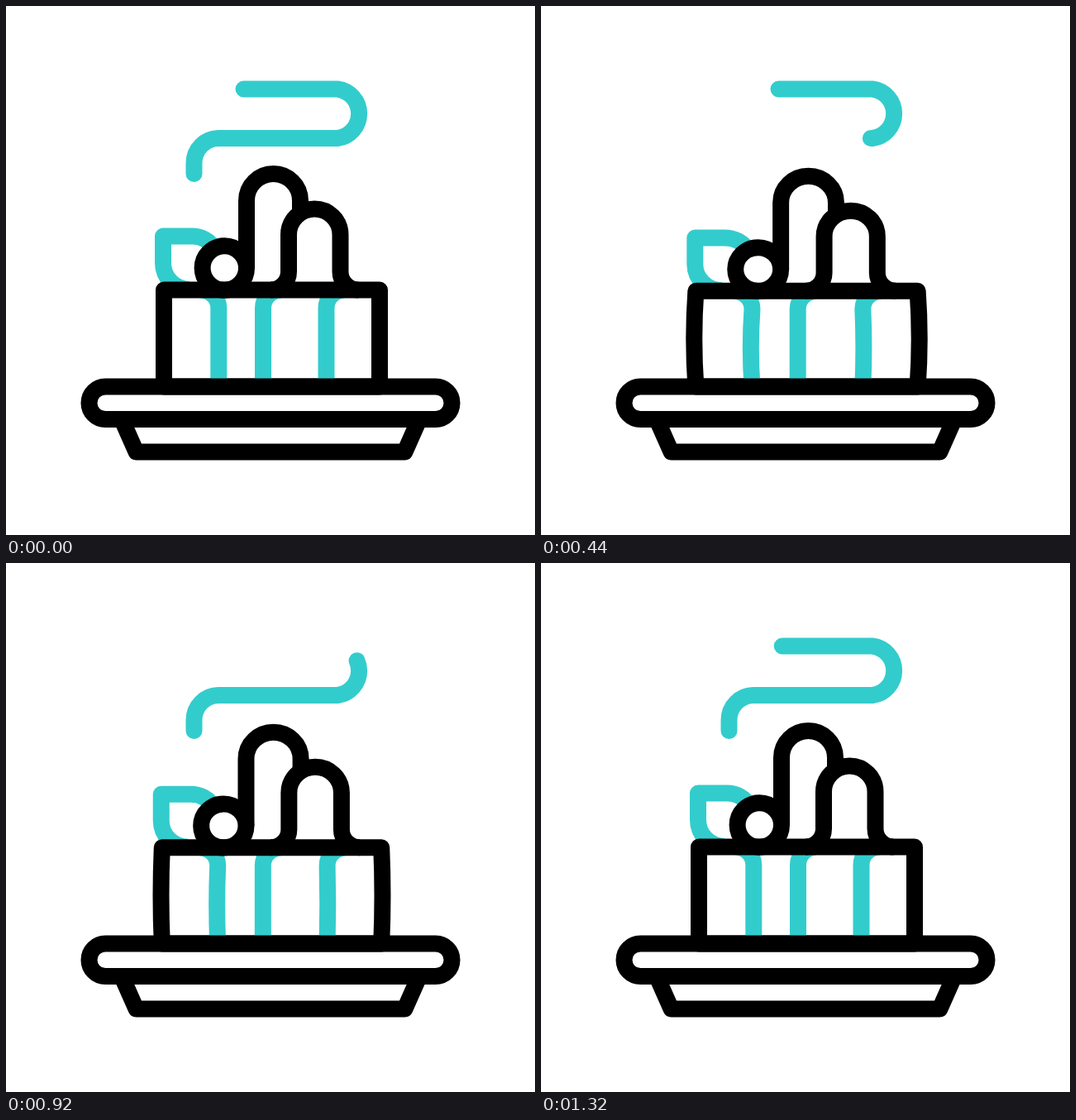
An HTML page that plays this animation: 640 px wide and 640 px high, repeating every 1480 ms.

```html
<!DOCTYPE html>
<html lang="en">
<head>
<meta charset="utf-8">
<title>Cake</title>
<style>
  html, body { margin: 0; width: 100%; height: 100%; overflow: hidden; background: #fff; }
  svg { display: block; width: 640px; height: 640px; }
  path, circle, rect { fill: none; stroke: #000; stroke-width: 20; stroke-linejoin: round; }
  #cake * { vector-effect: non-scaling-stroke; }
  .teal, .teal * { stroke: #33cccc; }
  #steam { stroke-linecap: round; }
  #berry { fill: #fff; }
</style>
</head>
<body>
<svg xmlns="http://www.w3.org/2000/svg" width="640" height="640">
  <path id="steam" class="teal" pathLength="1"
    d="M227.5 203V190A30 30 0 0 1 257.5 160H401A30 30 0 0 0 401 100.5H287.5"/>
  <path d="M140 500L157.5 539.5H482.5L500 500"/>
  <rect x="100.5" y="460.5" width="439" height="39.5" rx="19.75"/>
  <g id="cake">
    <g class="teal">
      <path id="dripL"/>
      <path id="dripM"/>
      <path id="dripR"/>
      <path d="M252 293A32 32 0 0 0 225 278.5H190V311A32 32 0 0 0 222 343"/>
    </g>
    <path d="M291 317V235.5A32.5 32.5 0 0 1 356 235.5V249"/>
    <circle id="berry" cx="264.3" cy="317" r="26.7"/>
    <path d="M320 343.5A22 22 0 0 0 342 321.5V276.7A31.25 31.25 0 0 1 404.5 276.7V321.5A22 22 0 0 0 426.5 343.5"/>
    <path id="body"/>
  </g>
</svg>
<script>
const LOOP = 1480, STEP = 40, LAST = 1320;
const CX = 321.5, TOP = 343.5, BASE = 460.5;
const $ = id => document.getElementById(id);
const clamp = x => Math.min(1, Math.max(0, x));
const smooth = x => x * x * (3 - 2 * x);

// [time, squash]: positive is flat and wide, negative is tall and narrow
const squashKeys = [[40, 0], [300, 1], [580, -0.54], [800, 0], [880, 0], [1050, 1], [1220, 0]];

function squashAt(t) {
  let value = squashKeys[0][1];
  for (let i = 1; i < squashKeys.length; i++) {
    const [t0, a] = squashKeys[i - 1], [t1, b] = squashKeys[i];
    if (t >= t0) value = a + (b - a) * smooth(clamp((t - t0) / (t1 - t0)));
  }
  return value;
}

function liftAt(t) {
  const x = (t - 695) / 195;
  return 30 * Math.max(0, 1 - x * x);
}

function bezier(x1, y1, x2, y2) {
  const at = (u, a, b) => 3 * u * (1 - u) * ((1 - u) * a + u * b) + u * u * u;
  return x => {
    let lo = 0, hi = 1;
    for (let i = 0; i < 24; i++) {
      const mid = (lo + hi) / 2;
      if (at(mid, x1, x2) < x) lo = mid; else hi = mid;
    }
    return at(lo, y1, y2);
  };
}
const flow = bezier(0.2, 0.2, 0.12, 1);

function drawSteam(t) {
  const erasing = t < 640;
  const from = erasing ? Math.pow(clamp((t - 40) / 543), 2.27) : 0;
  const to = erasing ? (t < 80 ? 1 : 1) : flow(clamp((t - 715) / 725));
  const len = to - from;
  const steam = $('steam');
  steam.style.visibility = len > 0.001 ? 'visible' : 'hidden';
  steam.setAttribute('stroke-dasharray', `${len} 2`);
  steam.setAttribute('stroke-dashoffset', -from);
}

// A drip that leaves the top edge sideways, then runs down with a bend
function drip(id, x, side, bend) {
  const y = TOP + 22;
  $(id).setAttribute('d',
    `M${x + side * 22} ${TOP}A22 22 0 0 ${side < 0 ? 1 : 0} ${x} ${y}Q${x + 2 * bend} ${(y + BASE) / 2} ${x} ${BASE}`);
}

function drawCake(t) {
  const s = squashAt(t);
  const sx = 1 + 0.122 * s;
  const sy = 1 - (s > 0 ? 0.047 : 0.078) * s;
  const k = s / sx, bulge = 18 * k, mid = (TOP + BASE) / 2;
  $('cake').setAttribute('transform',
    `translate(${CX} ${BASE - liftAt(t)}) scale(${sx} ${sy}) translate(${-CX} ${-BASE})`);
  drip('dripL', 257.3, -1, -7.3 * k);
  drip('dripM', 311, 1, 0);
  drip('dripR', 387.5, 1, 4.5 * k);
  $('body').setAttribute('d',
    `M191 ${TOP}H452Q${452 + bulge} ${mid} 452 ${BASE}H191Q${191 - bulge} ${mid} 191 ${TOP}Z`);
}

const start = performance.now();
function tick() {
  const now = (performance.now() - start) % LOOP;
  const t = Math.min(LAST, Math.floor(now / STEP) * STEP);
  drawSteam(t);
  drawCake(t);
  requestAnimationFrame(tick);
}
tick();
</script>
</body>
</html>
```
